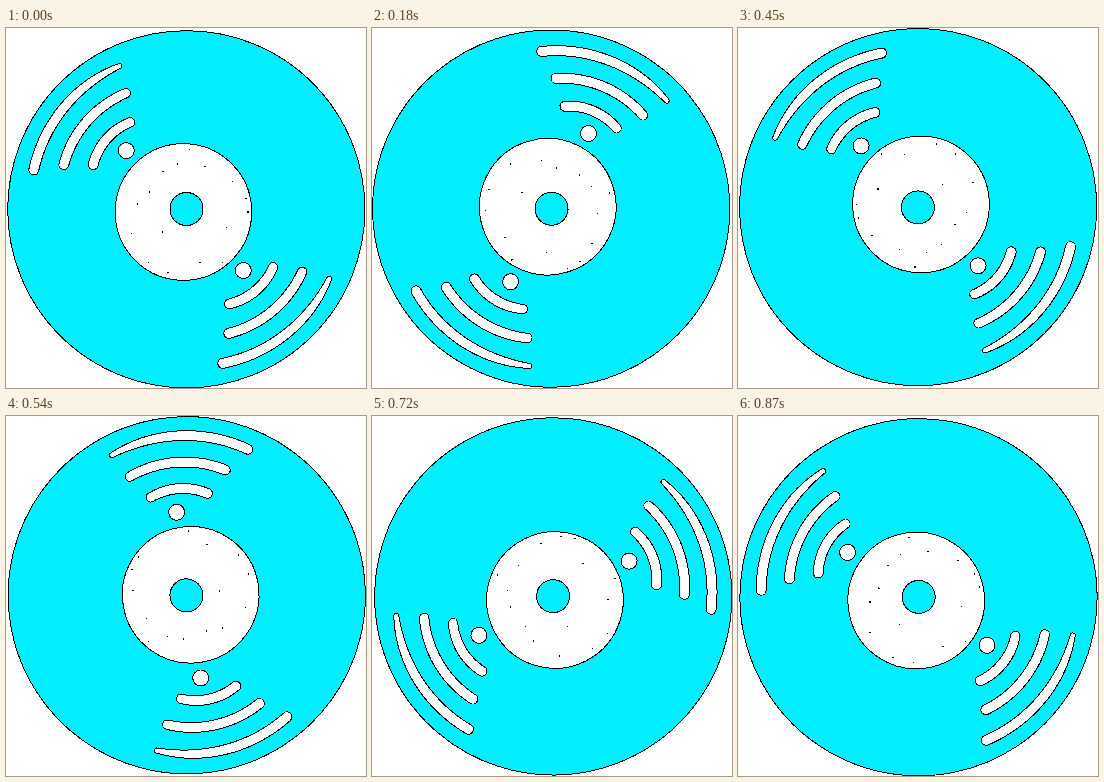
These frames come from a looping animation (360 px wide and 360 px high, 0.9 s). An HTML page:

```html
<!DOCTYPE html>
<html lang="en">
<head>
<meta charset="utf-8">
<title>Spinning record</title>
<style>
  html, body { margin: 0; width: 100%; height: 100%; overflow: hidden; background: #fff; }
  svg { display: block; width: 360px; height: 360px; }
  .cyan { fill: #00eeff; }
  .white { fill: #fff; }
  #record { stroke: #000; stroke-width: 1; }
</style>
</head>
<body>
<svg viewBox="0 0 360 360" shape-rendering="crispEdges">
  <g id="record">
    <circle class="cyan" cx="180.3" cy="181.3" r="178.6"/>
    <circle class="white" cx="177.4" cy="184" r="68.3"/>
    <circle class="cyan" cx="180.5" cy="181" r="16.5"/>
    <circle class="white" cx="120.3" cy="122.6" r="8"/>
    <circle class="white" cx="237.3" cy="242.5" r="8"/>
    <path id="slots" class="white"/>
    <path id="specks" stroke-width="1.3"/>
  </g>
</svg>
<script>
const STEP = 30, LOOP = 900, PIVOT = 180.2;
const $ = id => document.getElementById(id);

function polar(radius, degrees, cx = 180.5, cy = 180.5) {
  const a = degrees * Math.PI / 180;
  return `${(cx + radius * Math.cos(a)).toFixed(2)} ${(cy + radius * Math.sin(a)).toFixed(2)}`;
}

// Curved slot that bulges outwards and narrows towards its end.
function slot(radius, start, end, bulge, tip) {
  const wide = 5, outer = [], inner = [];
  for (let t = 0; t <= 1; t += 1 / 32) {
    const r = radius + bulge * 4 * t * (1 - t);
    const half = wide + (tip - wide) * t ** 4;
    const angle = start + (end - start) * t;
    outer.push(polar(r + half, angle));
    inner.unshift(polar(r - half, angle));
  }
  const sweep = end > start ? 1 : 0;
  return `M${outer.join('L')}A${tip} ${tip} 0 0 ${sweep} ${inner.join('L')}` +
    `A${wide} ${wide} 0 0 ${sweep} ${outer[0]}Z`;
}

// Three slots on one side; the outermost runs out to a thin tip.
function slotGroup(radius, middle, direction) {
  return [0, 1, 2].map(i => {
    const half = direction * (15.8 + 5.5 * i), thin = i === 2;
    const end = middle + half - (thin ? 3 * direction : 0);
    return slot(radius + 27.2 * i, middle - half, end, 2.8 - 0.8 * i, thin ? 2.5 : 4.7);
  }).join('');
}

// Fine specks on the label, denser towards its rim.
function specks(count) {
  let seed = 7, path = '';
  const random = () => (seed = seed * 16807 % 2147483647) / 2147483647;
  for (let i = 0; i < count; i++) {
    const radius = 64 - 44 * random() ** 3;
    path += `M${polar(radius, i * 137.5, 177.4, 184)}h1.3`;
  }
  return path;
}

$('slots').setAttribute('d', slotGroup(103.1, 221, 1) + slotGroup(104.6, 50, -1));
$('specks').setAttribute('d', specks(16));

function draw(now) {
  const angle = Math.floor(now % LOOP / STEP) * STEP / LOOP * 360;
  $('record').setAttribute('transform', `rotate(${angle} ${PIVOT} ${PIVOT})`);
  requestAnimationFrame(draw);
}
draw(0);
</script>
</body>
</html>
```
